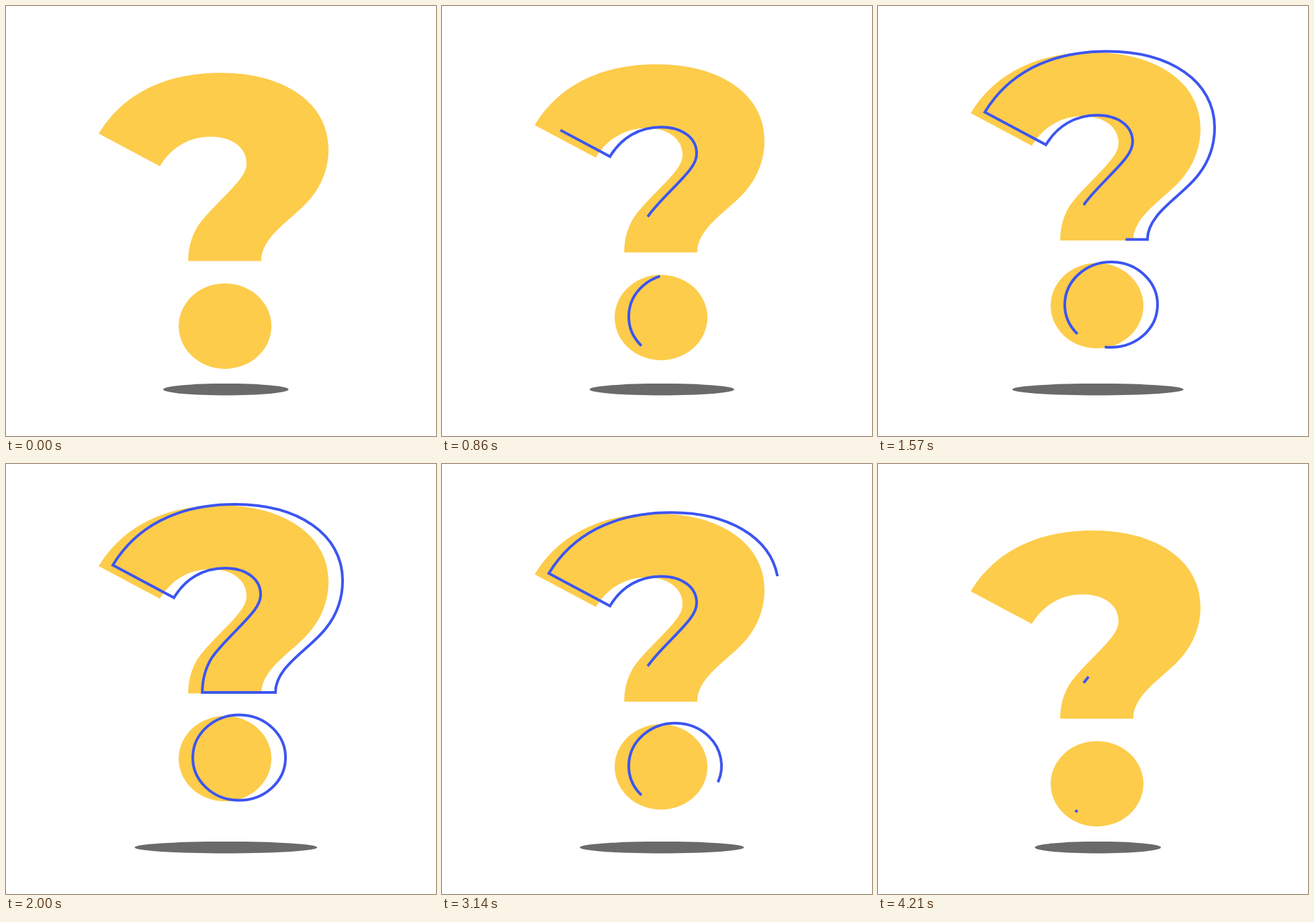
Write an HTML page that moves like this. It is 640 px wide and 640 px high and loops after 4280 ms.

```html
<!DOCTYPE html>
<html lang="en">
<head>
<meta charset="utf-8">
<title>Floating question mark</title>
<style>
  html, body { margin: 0; width: 100%; height: 100%; overflow: hidden; background: #fff; }
  svg { display: block; width: 100%; height: 100%; }
</style>
</head>
<body>
<svg viewBox="0 0 640 640">
  <defs>
    <path id="hook" pathLength="1" d="M285.2 328 C301 305 332 279 348 258 C355 249 358 242 358 234
      C358 211 337 194.5 305 194.5 C273 194.5 246 210 229 238.5 L138 190
      C172 134 232 99.5 320 99.5 C414 99.5 480 144 480 213 C480 241 470 265 456 283
      C432 315 380 340 380 379.5 L271.2 379.5 C271.2 360 276 343 285.2 328 Z"/>
    <path id="dot" pathLength="1" d="M275.8 520.1 A69 63.5 0 0 1 376.2 432.9 A69 63.5 0 0 1 275.8 520.1 Z"/>
  </defs>
  <ellipse id="shadow" cx="327.3" cy="570.7" ry="8.8" fill="#6a6a6a"/>
  <g id="mark">
    <g fill="#fdcc4b"><use href="#hook"/><use href="#dot"/></g>
    <g id="outline" transform="translate(21 -1.5)" fill="none" stroke="#3c55f0" stroke-width="4">
      <use href="#hook"/><use href="#dot"/>
    </g>
  </g>
</svg>
<script>
  const LOOP = 4280, STEPS = 60;
  const [shadow, mark, outline] = ['shadow', 'mark', 'outline'].map(id => document.getElementById(id));

  // Symmetric ease: cubic-bezier(h, 0, 1 - h, 1), solved by bisection.
  function ease(x, h) {
    if (x <= 0) return 0;
    if (x >= 1) return 1;
    let lo = 0, hi = 1;
    for (let i = 0; i < 30; i++) {
      const s = (lo + hi) / 2, r = 1 - s;
      const bx = 3 * h * s * r * r + 3 * (1 - h) * s * s * r + s ** 3;
      if (bx < x) lo = s; else hi = s;
    }
    return lo * lo * (3 - 2 * lo);
  }

  const ramp = (n, from, to, h) => ease((n - from) / (to - from), h);

  function draw(time) {
    const tick = Math.floor((time % LOOP) / 10) * 10 + 5;
    const n = Math.floor(tick * STEPS / LOOP);

    const lift = ramp(n, -0.5, 32.5, 1 / 3) - ramp(n, 32.5, 61, 1 / 3);
    mark.setAttribute('transform', `translate(0 ${-40 * lift})`);
    shadow.setAttribute('rx', 93.2 + 45 * lift);

    const drawn = 1.01 * (ramp(n, 4.2, 26.2, 1 / 4) - ramp(n, 35.2, 59.85, 1 / 6));
    outline.setAttribute('visibility', drawn > 0.001 ? 'visible' : 'hidden');
    outline.setAttribute('stroke-dasharray', drawn >= 1 ? 'none' : `${drawn} 2`);
  }

  function loop() {
    draw(performance.now());
    requestAnimationFrame(loop);
  }
  loop();
</script>
</body>
</html>
```
